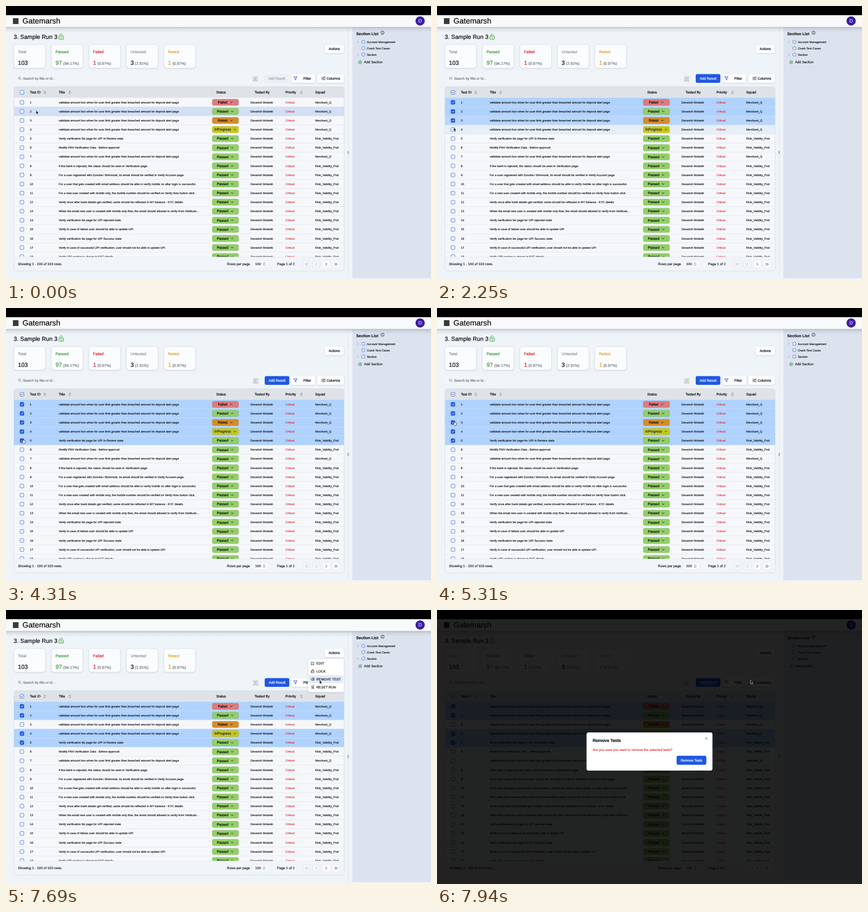
Recreate the animation shown at these times as an HTML page. Size 800 px wide and 517 px high, loop 8000 ms.

```html
<!DOCTYPE html>
<html lang="en">
<head>
<meta charset="utf-8">
<title>Test run</title>
<style>
  html, body { margin: 0; width: 100%; height: 100%; overflow: hidden; background: #eff4f9; }
  svg { display: block; width: 100vw; height: 100vh; }
  text {
    font-family: "Liberation Sans", Arial, sans-serif; text-rendering: geometricPrecision; white-space: pre;
    stroke: currentColor; stroke-width: .12;
  }
  .medium { stroke-width: .2; }
</style>
</head>
<body>
<svg id="stage" viewBox="0 0 800 517" xmlns="http://www.w3.org/2000/svg"></svg>
<script>
const LOOP = 8000, ROW_TOP = 173.2, ROW_H = 17.125;
const XS = 5.53, SM = 6.45, MD = 7.37, XL = 11.06;
const INK = '#06070a', BLUE = '#2158e0', RED = '#dc2020', MUTED = '#9aa0aa', DISABLED = '#ebeff3';

const text = (x, y, s, size = SM, fill = INK, extra = '') =>
  `<text x="${x}" y="${y}" font-size="${size}" fill="${fill}" color="${fill}" ${extra}>${s}</text>`;
const medium = (x, y, s, size, fill, extra = '') => text(x, y, s, size, fill, `class="medium" ${extra}`);
const middle = 'text-anchor="middle"';
const rect = (x, y, w, h, fill, r = 0, extra = '') =>
  `<rect x="${x}" y="${y}" width="${w}" height="${h}" rx="${r}" fill="${fill}" ${extra}/>`;
const line = (d, color = INK, width = .8, extra = '') =>
  `<path d="${d}" fill="none" stroke="${color}" stroke-width="${width}" stroke-linecap="round" stroke-linejoin="round" ${extra}/>`;
const circle = (x, y, r, fill, extra = '') => `<circle cx="${x}" cy="${y}" r="${r}" fill="${fill}" ${extra}/>`;
const group = (id, body, extra = '') => `<g id="${id}" ${extra}>${body}</g>`;
const box = (x, y, size = 7.2) =>
  rect(x - size / 2, y - size / 2, size, size, '#f4f8ff', size / 4, 'stroke="#3f72dc" stroke-width=".9"');
const tick = (x, y, color) => line(`M${x - 1.9} ${y + .1}l1.4 1.5 2.5 -3`, color, .95);
const sorter = (x, y) => line(`M${x - 1.6} ${y - 1}l1.6 -1.6 1.6 1.6M${x - 1.6} ${y + 1}l1.6 1.6 1.6 -1.6`, '#333', .7);
const raised = 'filter="url(#soft)"';

const user = 'Devarish Molanki';
const limitTitle = 'valitdate amount box when for user limit greater than breached amount for deposit alert page';
const titles = [
  limitTitle, limitTitle, limitTitle, limitTitle,
  'Verify verification list page for UPI In Review state',
  'Modify PAN Verification Data - Before approval',
  limitTitle,
  'If the bank is rejected, the status should be seen in Verification page.',
  'For a user registered with Zunobe / Brimnook, its email should be verified in Verify Account page.',
  'For a user that gets created with email address should be able to verify mobile no after login is successful.',
  'For a new user created with mobile only, the mobile number should be verified on Verify Now button click.',
  'Verify once after bank details get verified, same should be reflected in MY balance - KYC details',
  'When the email new user is created with mobile only flow, the email should allowed to verify from Verificati…',
  'Verify verification list page for UPI rejected state',
  'Verify in case of failure user should be able to update UPI',
  'Verify verification list page for UPI Success state',
  'Verify in case of successful UPI verification, user should not be able to update UPI',
  'Verify UPI section is shown in KYC details'
];
const statuses = {
  Passed: ['#92cf66', 425.7], Failed: ['#dd7b7b', 424], Retest: ['#d58c2b', 424.3], InProgress: ['#c9c90a', 431]
};
const firstStatuses = ['Failed', 'Passed', 'Retest', 'InProgress'];
const rowY = i => ROW_TOP + ROW_H * (i + .5);

function header() {
  return rect(0, 39, 800, 11, 'url(#drop)') + rect(0, 17, 800, 22.5, '#f8f9fa') + rect(0, 0, 800, 17.3, '#000') +
    rect(13, 23, 10.5, 11, '#3a3a3a') +
    medium(31, 33.2, 'Gatemarsh', 14.4, INK) +
    circle(779.5, 28.2, 8.7, '#3b1fa3') + text(779.5, 31.4, user[0], 9, '#e6e0ff', middle);
}

function cards() {
  const data = [
    ['Total', '103', '', '#858c98', INK], ['Passed', '97', '(94.17%)', '#2f9638', '#3f9646'],
    ['Failed', '1', '(0.97%)', '#d92222', '#d92222'], ['Untested', '3', '(2.91%)', '#8b94a3', INK],
    ['Retest', '1', '(0.97%)', '#e2a126', '#e2a126']
  ];
  return data.map(([label, count, share, tone, ink], i) => {
    const x = 15 + i * 70.6;
    return rect(x, 73, 59, 44, '#fbfcfd', 5, `stroke="#dfe4ea" stroke-width=".6" ${raised}`) +
      medium(x + 7.6, 88.6, label, MD, tone) + medium(x + 7.6, 110.6, count, XL, ink) +
      text(x + 9.6 + count.length * 6.15, 110.6, share, MD, '#5d6470');
  }).join('');
}

function toolbar() {
  const lock = rect(99.5, 56.5, 8.8, 6.2, '#d5f0d5', 1, 'stroke="#3c9a45" stroke-width=".9"') +
    line('M101.5 56.3v-1.3a2.3 2.3 0 0 1 4.6 -.3M103.9 59v1.4', '#3c9a45', .9);
  const addResult = rect(486.3, 128.5, 46.3, 16.5, DISABLED, 3, 'id="addBox"') +
    medium(509.5, 138.8, 'Add Result', SM, MUTED, `id="addText" ${middle}`);
  const key = rect(464, 132, 10.5, 9.5, '#d8dce2', 1.5) + line('M464.5 141.7h9.5', '#9aa0a9', .7) +
    text(469.2, 138.7, '/', 5.5, '#777', middle);
  return medium(14.5, 61.8, '3. Sample Run 3', XL, INK) + lock + cards() +
    rect(600, 73, 36, 16, '#fdfdfe', 3, raised) + medium(618, 83.4, 'Actions', SM, INK, middle) +
    rect(15, 128.5, 466, 16.5, '#f1f5f8', 3) + circle(25.4, 136, 2, 'none', 'stroke="#666" stroke-width=".7"') +
    line('M27 137.6l1.5 1.5', '#666', .7) + text(32, 139, 'Search by title or id...', SM, '#5d6470') +
    group('shift', key + addResult) +
    rect(537, 128.5, 45, 16.5, '#fdfdfe', 3, raised) + line('M541.7 133.7h6.4l-2.4 3v2.8l-1.6 -.9v-1.9z', '#2946d8', .9) +
    medium(567, 138.8, 'Filter', SM, INK, middle) +
    rect(586, 128.5, 50, 16.5, '#fdfdfe', 3, raised) +
    line('M594.5 134.3h.5M596.8 134.3h4M594.5 136.6h4M600.3 136.6h.5M594.5 138.9h.5M596.8 138.9h4', INK, .9) +
    medium(616.3, 138.8, 'Columns', SM, INK, middle);
}

function row(title, i) {
  const y = rowY(i), top = ROW_TOP + ROW_H * i;
  const status = firstStatuses[i] || 'Passed', [tone, arrow] = statuses[status];
  const squad = i < 4 || i === 6 ? 'Merchant_Q' : 'Risk_Validity_Pod';
  const cell = (x, s, fill) => text(x, y + 1.9, s, XS, fill);
  return rect(15, top, 621.5, ROW_H, '#d2dff5', 0, `id="hover${i}" opacity="0"`) +
    rect(15, top, 621.5, ROW_H, '#b0d2ff', 0, `id="selected${i}" opacity="0"`) +
    rect(15, top + ROW_H - .5, 621.5, .6, '#dde2e9') + box(30, y) +
    group('check' + i, rect(26, y - 4, 8, 8, BLUE, 2) + tick(30, y, '#fff'), 'display="none"') +
    cell(45, i + 1) + cell(99.2, title) +
    rect(388.2, y - 6.1, 49.6, 12.2, tone, 3, 'stroke="#333" stroke-opacity=".22" stroke-width=".6"') +
    medium(407.8, y + 2.2, status, SM, status === 'InProgress' ? '#12237a' : INK, middle) +
    line(`M${arrow - 1.9} ${y - .9}l1.9 1.9 1.9 -1.9`, INK, .85) +
    cell(460.3, user) + cell(526, 'Critical', '#e02424') + cell(582, squad);
}

function pager() {
  const chevron = (x, dir) => `M${x - dir} 485l${dir * 2} 2.2 ${-dir * 2} 2.2`;
  const button = (x, dir, count, active) =>
    rect(x - 6.8, 480.3, 13.6, 13.8, active ? '#fdfdfe' : '#f3f6f9', 3, 'stroke="#dce1e8" stroke-width=".6"') +
    (count > 1 ? [x - 1.4, x + 1.4] : [x]).map(cx => line(chevron(cx, dir), active ? INK : '#a4abb5', .75)).join('');
  return rect(15, 473.6, 621.5, 26.4, '#f1f4f8', 4) + line('M15.3 473.8h621', '#dde2e9', .5) +
    text(22.5, 489.3, 'Showing 1 - 100 of 103 rows.') + text(416, 489.3, 'Rows per page') +
    rect(463, 480, 32, 14.5, '#f6f8fa', 3, 'stroke="#e2e6eb" stroke-width=".6"') +
    text(469, 489.3, '100') + sorter(486, 487) + text(510.3, 489.3, 'Page 1 of 2') +
    button(565.6, -1, 2, false) + button(584.2, -1, 1, false) + button(602.9, 1, 1, true) + button(621.2, 1, 2, true);
}

function table() {
  const heads = [['Test ID', 45, 73], ['Title', 99.2, 120], ['Status', 395.8], ['Tested By', 468], ['Priority', 526, 556], ['Squad', 582]];
  const y = 162.9;
  return rect(15, 152.3, 621.5, 347.7, '#f5f7fa', 5) +
    `<path d="M15 173.2V157.3a5 5 0 0 1 5 -5H631.5a5 5 0 0 1 5 5V173.2z" fill="#dfe3e8"/>` +
    box(30, y) + group('headTick', tick(30, y, '#24418f'), 'display="none"') +
    heads.map(([s, x, sort]) => medium(x, 165.2, s, SM, INK) + (sort ? sorter(sort, y) : '')).join('') +
    `<g clip-path="url(#rows)">${titles.map(row).join('')}</g>` + pager() +
    rect(15, 152.3, 621.5, 347.7, 'none', 5, 'stroke="#d3d9e1" stroke-width=".7"');
}

function sidebar() {
  const items = ['Account Management', 'Crash Test Cases', 'Section'];
  return rect(652, 40, 148, 473.5, '#dce3ef') + rect(643.8, 40, .7, 473.5, '#d9dfe7') +
    rect(642.3, 273, 3.6, 6.4, '#d5dae2', 1) + line('M643.5 274.7h1.2M643.5 276.3h1.2M643.5 277.9h1.2', '#666', .6) +
    text(659.2, 55, 'Section List', MD, INK, 'font-weight="bold"') +
    circle(708.7, 50.4, 3.1, 'none', `stroke="${INK}" stroke-width=".7"`) + line('M708.7 50.2v1.7M708.7 48.7v.1', INK, .7) +
    items.map((s, i) => {
      const y = 67.6 + i * 12;
      return (i === 1 ? '' : line(`M661.5 ${y - 1.7}l1.6 1.7 -1.6 1.7`, '#777', .6)) +
        box(672.6, y, 5.4) + text(679.2, y + 1.9, s, XS);
    }).join('') +
    circle(666.7, 106, 3.1, 'none', 'stroke="#2f9638" stroke-width=".8"') +
    line('M665.2 106h3M666.7 104.5v3', '#2f9638', .8) + text(674, 108.3, 'Add Section');
}

function menu() {
  const icons = [
    'M577.5 98.4h-2.8v5h5v-2.7M577 101.2l3 -3.2',
    'M574.9 115h4.8v3.4h-4.8zM575.9 115v-1.2a1.4 1.4 0 0 1 2.8 0v1.2',
    'M574.2 130.5l1.8 -2.1h4v4.2h-4zM577 129.6l1.8 1.8M578.8 129.6l-1.8 1.8',
    'M574.8 143.3h5l-1 -1M575 145.5h2v2.6h-2M579.6 145.5h-1.4v2.6h1.4'
  ];
  const labels = ['EDIT', 'LOCK', 'REMOVE TEST', 'RESET RUN'];
  return rect(568.7, 92, 67.4, 63, '#fff', 3, `stroke="#dfe3e9" stroke-width=".5" ${raised}`) +
    labels.map((s, i) => rect(570.2, 93.3 + i * 14.9, 64.4, 14.9, '#e3ebf9', 2, `id="item${i}"`) +
      line(icons[i], INK, .7) + text(584.2, 103.1 + i * 14.9, s)).join('');
}

const dialog = () => rect(281.5, 231, 237, 72, '#fff', 4) +
  text(293, 249.3, 'Remove Tests', 8.3, INK, 'font-weight="bold" letter-spacing="-.2"') +
  line('M505.1 240.6l3.8 3.8M508.9 240.6l-3.8 3.8', '#444', .75) +
  text(293, 265.5, 'Are you sure you want to remove the selected tests?', SM, RED) +
  rect(451, 275, 56, 17, BLUE, 3) + medium(479, 285.7, 'Remove Tests', SM, '#fff', middle);

const pointers = '<path id="arrow" d="M0 0V6.6L1.5 5.2 2.6 7.6 3.8 7.1 2.7 4.7H4.7Z" fill="#000" stroke="#fff" stroke-width=".5"/>' +
  '<path id="hand" d="M0 .6Q.7 -.3 1.3 .6V2.9Q2 2.5 2.5 3.1 3.2 2.8 3.6 3.4 4.6 3.2 4.7 4.2V5.8Q4.6 7 4 8.2H.7Q-.2 6.7 -1.7 4.9 -1.6 3.9 -.6 4.3L0 4.9Z" fill="#fff" stroke="#000" stroke-width=".65"/>';

const stage = document.getElementById('stage');
stage.innerHTML = `<defs>
  <linearGradient id="drop" x2="0" y2="1"><stop stop-color="#8d949c" stop-opacity=".55"/>
    <stop offset=".4" stop-color="#8d949c" stop-opacity=".18"/><stop offset="1" stop-color="#8d949c" stop-opacity="0"/></linearGradient>
  <filter id="soft" x="-10%" y="-20%" width="120%" height="150%"><feDropShadow dx="0" dy=".7" stdDeviation=".8" flood-color="#526070" flood-opacity=".28"/></filter>
  <clipPath id="rows"><rect x="15" y="173" width="622" height="300.6"/></clipPath></defs>` +
  rect(0, 0, 800, 517, '#eff4f9') + sidebar() + header() + toolbar() + table() + group('menu', menu()) +
  rect(0, 17, 800, 500, '#000', 0, 'id="shade"') + group('dialog', dialog()) + group('pointer', pointers);

const parts = {};
stage.querySelectorAll('[id]').forEach(el => parts[el.id] = el);
const set = (id, name, value) => parts[id].setAttribute(name, value);
const show = (id, on) => set(id, 'display', on ? 'inline' : 'none');

// Pointer stops: time, x, y
const stops = [
  [0, 56.7, 197.3], [200, 56.7, 197.3], [600, 30, 179.8], [900, 30, 179.8], [1100, 30, 196.6], [1500, 30, 196.6],
  [1700, 31, 213.2], [2110, 31, 213.2], [2250, 31.6, 229.6], [3400, 31.6, 230], [3650, 31.6, 247], [4700, 31.6, 247],
  [5050, 32.2, 213.4], [5600, 32.2, 213.4], [6350, 618, 80], [7050, 618, 80], [7400, 590.3, 132.6], [LOOP, 590.3, 132.6]
];
const clicks = [[760, 0], [1420, 1], [2090, 2], [2550, 3], [3950, 4], [5450, 2]];
const MENU_AT = 6700, DIALOG_AT = 7740, FADE = 150;
const fadeLags = [0, 50, 100, 150, 200];

function pointerAt(time) {
  const t = Math.max(0, time);
  const i = Math.max(1, stops.findIndex(s => s[0] >= t));
  const [t0, x0, y0] = stops[i - 1], [t1, x1, y1] = stops[i];
  const p = (t - t0) / (t1 - t0), k = p * p * (3 - 2 * p);
  return [x0 + (x1 - x0) * k, y0 + (y1 - y0) * k];
}
function hoveredRow(t) {
  const [x, y] = pointerAt(t);
  return x < 636 && y < 473 ? Math.floor((y - ROW_TOP) / ROW_H) : -1;
}
function overControl(t) {
  const [x, y] = pointerAt(t);
  const onBox = Math.abs(x - 30) < 5 && Math.abs(y - rowY(hoveredRow(t))) < 4.2;
  return onBox || (x > 600 && y > 73 && y < 89);
}
const isSelected = (t, i) => clicks.filter(([at, row]) => row === i && t >= at).length % 2 === 1;
// Share of the recent past in which a state held, used as a fade
const recently = (t, holds) => fadeLags.filter(lag => holds(t - lag)).length / fadeLags.length;

function render(t) {
  titles.forEach((_, i) => {
    show('check' + i, isSelected(t, i));
    set('selected' + i, 'opacity', recently(t, past => isSelected(past, i)));
    set('hover' + i, 'opacity', t < DIALOG_AT ? recently(t, past => hoveredRow(past) === i) : 0);
  });

  const any = titles.some((_, i) => isSelected(t, i));
  show('headTick', any);
  set('shift', 'transform', `translate(${any ? .7 : 0})`);
  set('addBox', 'fill', any ? BLUE : DISABLED);
  set('addText', 'fill', any ? '#fff' : MUTED);
  set('addText', 'color', any ? '#fff' : MUTED);

  const [x, y] = pointerAt(t);
  show('menu', t >= MENU_AT && t < DIALOG_AT);
  for (let i = 0; i < 4; i++) show('item' + i, x > 569 && Math.floor((y - 93.3) / 14.9) === i);

  const open = Math.min(1, Math.max(0, (t - DIALOG_AT) / FADE));
  set('shade', 'opacity', .86 * open);
  set('dialog', 'opacity', open);
  set('dialog', 'transform', `translate(400 267) scale(${.95 + .05 * open}) translate(-400 -267)`);

  const hand = overControl(t - 70);
  show('hand', hand);
  show('arrow', !hand);
  set('pointer', 'transform', `translate(${x} ${y})`);
}

const start = performance.now();
function frame() {
  render((performance.now() - start) % LOOP);
  requestAnimationFrame(frame);
}
frame();
</script>
</body>
</html>
```
